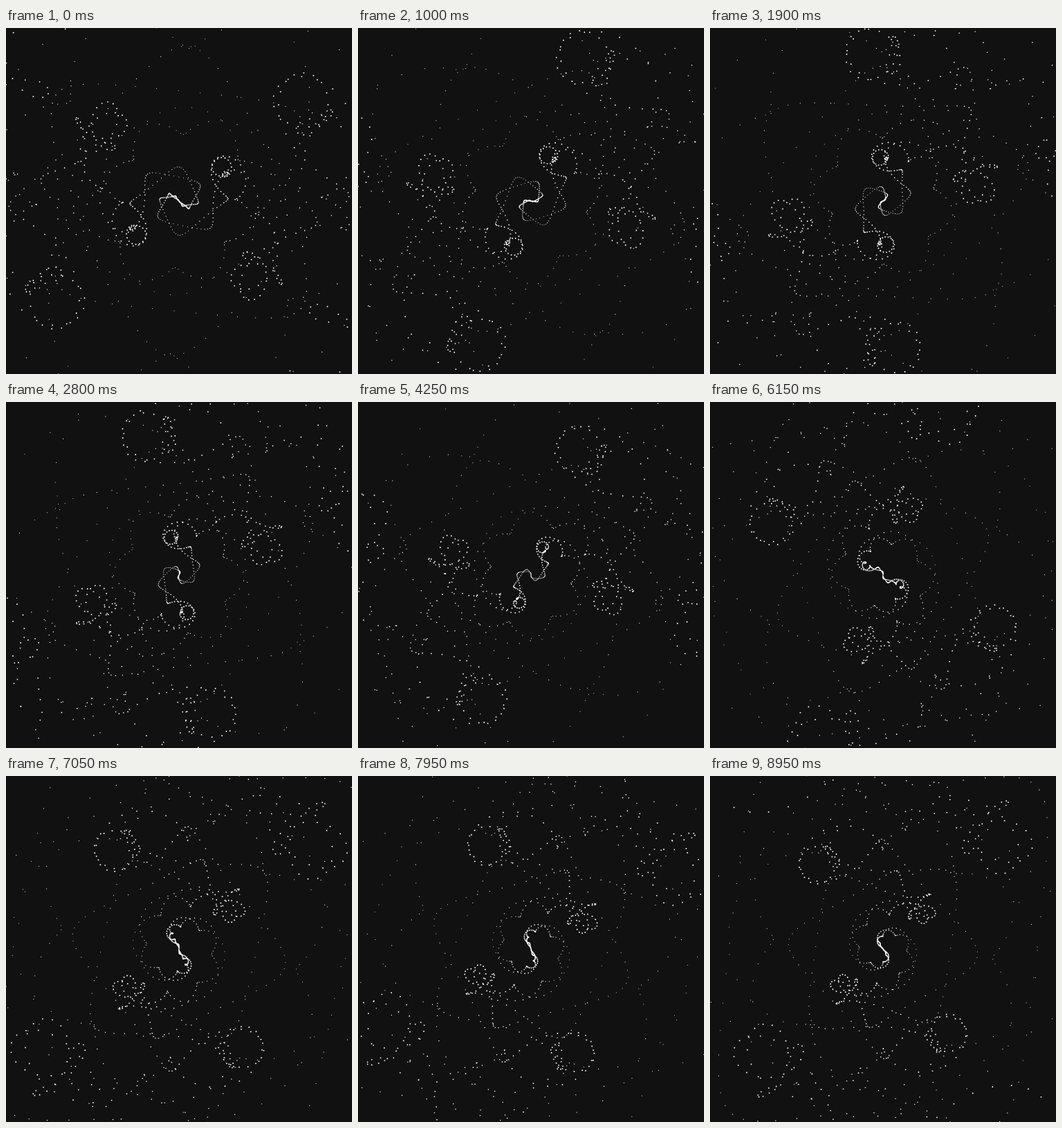
An HTML page with a canvas for the animation above (9000 ms loop, 500 px wide and 500 px high).

```html
<!DOCTYPE html>
<html lang="en">
<head>
<meta charset="utf-8">
<title>Dot vortex</title>
<style>
  html, body { margin: 0; width: 100%; height: 100%; overflow: hidden; background: #111; }
  canvas { display: block; width: 100vmin; height: 100vmin; }
</style>
</head>
<body>
<canvas id="stage" width="500" height="500"></canvas>
<script>
  const ctx = document.getElementById('stage').getContext('2d');
  const TAU = Math.PI * 2;
  const LOOP = 9000, STEP = 50;
  const DOTS = 1000, REACH = 300;
  const RING = 75;               // distance between turning points of the spiral
  const SWING = Math.PI * 0.75;  // how far the arms wind between two rings
  const LOOP_SIZE = 0.17;        // small orbit relative to the distance from the centre
  const rad = deg => deg * Math.PI / 180;

  // Heading of the innermost turning point: a quarter turn per loop plus a sway.
  const heading = t =>
    rad(-73 + 90 * t + 32 * Math.cos(TAU * t) - 52 * Math.sin(TAU * t));

  function dot(x, y, r) {
    ctx.moveTo(x + r, y);
    ctx.arc(x, y, r, 0, TAU);
  }

  function draw(t) {
    ctx.fillStyle = '#111';
    ctx.fillRect(0, 0, 500, 500);
    ctx.fillStyle = '#fff';
    ctx.beginPath();
    const base = heading(t) + SWING;
    for (let i = 1; i <= DOTS; i++) {
      const dist = REACH * i / DOTS;
      const phase = dist / RING + t - 0.05;
      const wave = Math.cos(Math.PI * phase);
      const angle = base + SWING * wave + (i % 2) * Math.PI;
      const strand = (i >> 1) % 2 * Math.PI;
      const orbit = angle + TAU * 4 * phase + strand;
      const small = dist * LOOP_SIZE;
      dot(250 + dist * Math.cos(angle) + small * Math.cos(orbit),
          250 + dist * Math.sin(angle) + small * Math.sin(orbit),
          0.5 + 0.45 * Math.abs(wave));
    }
    ctx.fill();
  }

  function frame() {
    const now = performance.now() % LOOP;
    draw(Math.floor(now / STEP) * STEP / LOOP);
    requestAnimationFrame(frame);
  }
  frame();
</script>
</body>
</html>
```
